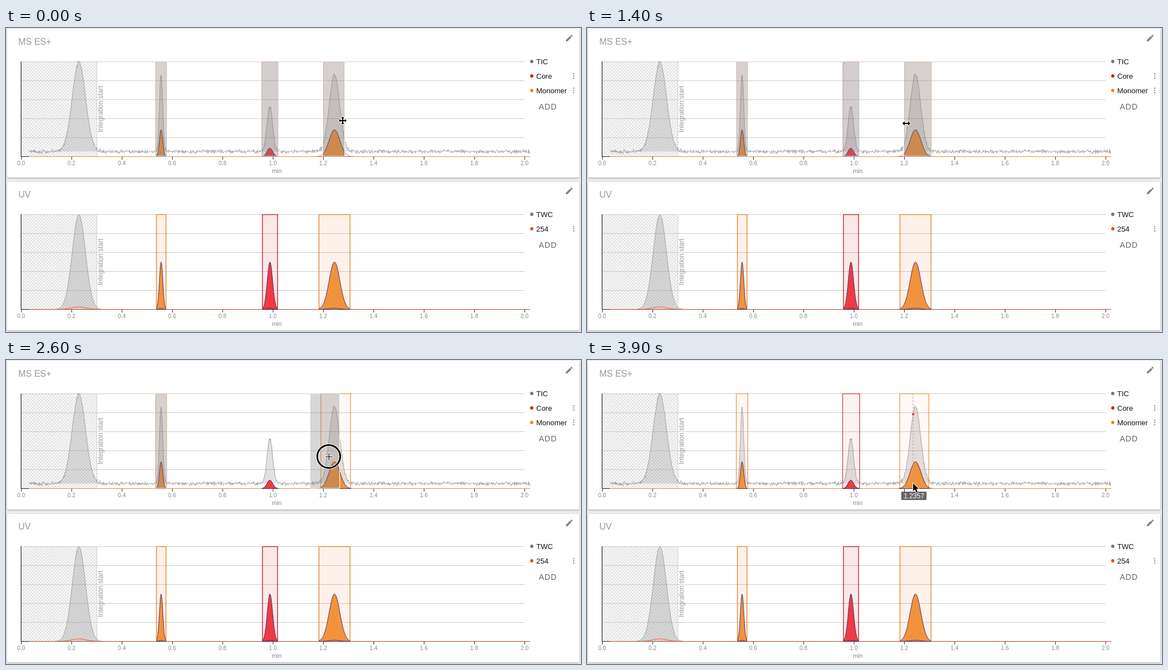
An HTML page for the animation above (4 s loop, 1028x545 px).

```html
<!DOCTYPE html>
<html lang="en">
<head>
<meta charset="utf-8">
<title>Chromatogram</title>
<style>
  html, body { margin: 0; width: 100%; height: 100%; overflow: hidden; background: #ececec; }
  svg { display: block; width: 1028px; height: 545px; font-family: "Liberation Sans", Arial, sans-serif; }
  .card { fill: #fff; filter: drop-shadow(0 1px 1.5px rgba(0,0,0,.3)); }
  .title { font-size: 16px; fill: #999; }
  .tick { font-size: 10px; fill: #888; text-anchor: middle; }
  .unit { font-size: 11px; fill: #888; text-anchor: middle; }
  .legend { font-size: 13px; fill: #111; }
  .add { font-size: 14px; fill: #666; letter-spacing: 1px; }
  .note { font-size: 12px; fill: #999; }
  .line { fill: none; stroke-width: 1; }
  .area { stroke: #43306b; stroke-width: 1; }
  .select { fill: #777; fill-opacity: .3; stroke: #fff; }
</style>
</head>
<body>
<svg id="stage" viewBox="0 0 1028 545">
  <defs>
    <pattern id="hatch" width="4" height="4" patternUnits="userSpaceOnUse" patternTransform="rotate(45)">
      <path d="M0 2H4M2 0V4" stroke="#ccc" stroke-width=".7"/>
    </pattern>
  </defs>
</svg>
<script>
const stage = document.getElementById('stage');
const ORANGE = '#e8892c', RED = '#c8202c', GRAY = '#9a9a9a';
const ORANGE_FILL = '#f2923c', RED_FILL = '#f03a42', ORANGE_TINT = '#f57a30';
const LEFT = 27, RIGHT = 927, START = 41, END = 937, HEIGHT = 170;
const MS = 230, UV = 504;
const MS_ZERO = MS + .5, UV_ZERO = UV + .5;

function add(tag, attrs, parent = stage, text) {
  const el = document.createElementNS(stage.namespaceURI, tag);
  set(el, attrs);
  if (text !== undefined) el.textContent = text;
  return parent.appendChild(el);
}
function set(el, attrs) {
  for (const key in attrs) el.setAttribute(key, attrs[key]);
}
const show = (el, on) => el.setAttribute('visibility', on ? 'visible' : 'hidden');
const label = (cls, x, y, text, more) => add('text', { class: cls, x, y, ...more }, stage, text);
const stroke = (d, color, width = 1, parent) =>
  add('path', { d, class: 'line', stroke: color, style: `stroke-width:${width}` }, parent);

// A peak is [centre, height, sigma].
const gauss = (x, [c, h, s]) => h * Math.exp(-((x - c) ** 2) / (2 * s * s));
const sum = (x, peaks) => peaks.reduce((total, p) => total + gauss(x, p), 0);

function trace(from, to, step, f) {
  let d = '';
  for (let x = from; x < to; x += step) d += `${d ? 'L' : 'M'}${x.toFixed(2)} ${f(x).toFixed(2)}`;
  return d + `L${to} ${f(to).toFixed(2)}`;
}
const areaPath = (from, to, zero, peak) =>
  trace(from, to, .5, x => zero - gauss(x, peak)) + `L${to} ${zero}L${from} ${zero}Z`;
const area = (from, to, zero, peak, fill) =>
  add('path', { class: 'area', d: areaPath(from, to, zero, peak), fill });

let seed = 11;
function random() {
  seed = (seed * 16807) % 2147483647;
  return seed / 2147483647;
}

function box(x0, x1, zero, color, tint, opacity, width) {
  return add('rect', {
    x: x0, y: zero - HEIGHT, width: x1 - x0, height: HEIGHT,
    fill: tint, 'fill-opacity': opacity, stroke: color, 'stroke-width': width
  });
}

function drawFrame(base, cardTop, cardHeight, title, legend) {
  const top = base - HEIGHT;
  add('rect', { class: 'card', x: 2, y: cardTop, width: 1023, height: cardHeight, rx: 2 });
  label('title', 22, top - 30, title);
  add('path', {
    transform: `translate(999 ${top - 50}) scale(.667)`, fill: '#808080',
    d: 'M3 17.25V21h3.75L17.8 9.94l-3.75-3.75zM20.7 7c.4-.4.4-1 0-1.4l-2.3-2.3c-.4-.4-1-.4-1.4 0l-1.9 1.8 3.8 3.8z'
  });
  for (let i = 0; i < 5; i++) stroke(`M${LEFT} ${top + i * 34 + .5}H${RIGHT}`, '#ccc');
  add('rect', { x: LEFT, y: top, width: 136, height: HEIGHT, fill: 'url(#hatch)' });
  stroke(`M162.5 ${top}V${base}`, '#d0d0d0');
  label('note', 0, 0, 'Integration start', { transform: `translate(172.5 ${top + 127}) rotate(-90)` });

  legend.forEach(([name, color, menu], i) => {
    const y = top + i * 26;
    add('circle', { cx: 940, cy: y, r: 2.9, fill: color });
    label('legend', 948, y + 5, name);
    if (menu) for (const dy of [-4, 0, 4]) add('circle', { cx: 1015, cy: y + dy, r: 1.3, fill: '#999' });
  });
  label('add', 952.5, top + legend.length * 26 + 8, 'ADD');
}

function drawAxis(base) {
  stroke(`M${LEFT} ${base - HEIGHT}V${base + .5}`, '#555', 1.6);
  stroke(`M${LEFT} ${base + .5}H${START}`, '#222');
  for (let i = 0; i <= 10; i++) {
    const x = LEFT + i * 90;
    stroke(`M${x + .5} ${base + 1}v5`, '#333');
    label('tick', x, base + 16, (i / 5).toFixed(1));
  }
  label('unit', 484, base + 30, 'min');
}

// Upper chart
drawFrame(MS, 1, 267, 'MS ES+', [['TIC', '#757575'], ['Core', '#d81e1e', 1], ['Monomer', '#ec881e', 1]]);
const FLOOR = 221.5;
const tic = [[130.3, 160, 12], [277.3, 138, 2.9], [471.7, 80, 5], [587.3, 138, 9.4]];
const monomerA = [277.3, 48, 2.9], core = [471.7, 15, 5], monomerB = [587.3, 48, 9.6];

for (const p of tic) {
  const reach = p[2] * 2.9;
  add('path', { d: areaPath(p[0] - reach, p[0] + reach, FLOOR, p), fill: '#777', 'fill-opacity': .22 });
}
stroke(trace(START, END, .7, x => FLOOR - sum(x, tic) + (random() + random() - 1) * 4.2), GRAY, .9);

const boxA = box(267, 287.5, MS_ZERO, ORANGE, ORANGE_TINT, .05, 1.1);
const boxCore = box(457, 487.5, MS_ZERO, RED, RED, .06, 1.1);
const boxB = box(567, 605, MS_ZERO, ORANGE, ORANGE_TINT, .05, 1.1);
stroke(trace(START, END, .7, x => MS_ZERO - gauss(x, core)), RED);
stroke(trace(START, END, .7, x => MS_ZERO - sum(x, [monomerA, monomerB])), ORANGE, 1.1);
area(268, 287, MS_ZERO, monomerA, ORANGE_FILL);
area(457, 487, MS_ZERO, core, RED_FILL);
const areaB = area(567, 605, MS_ZERO, monomerB, ORANGE_FILL);

const selection = (x0, x1) =>
  add('rect', { class: 'select', x: x0 - .5, y: 60, width: x1 - x0 + 1, height: HEIGHT });
const selectA = selection(267, 287.5), selectCore = selection(457, 487), selectB = selection(567, 605);
drawAxis(MS);

// Lower chart
drawFrame(UV, 276, 266, 'UV', [['TWC', '#757575'], ['254', '#e8501e', 1]]);
const solvent = [130.3, 170, 11.8];
add('path', { d: areaPath(90, 168, UV_ZERO, solvent), fill: '#777', 'fill-opacity': .24, stroke: GRAY, 'stroke-width': .9 });
stroke(trace(START, END, 1, x => UV_ZERO - gauss(x, [130.3, 4.5, 13])), '#f0704e', 1.2);
const bands = [
  [269, 286, 277.3, 3, ORANGE, ORANGE_FILL, ORANGE_TINT],
  [458.5, 485.5, 471.9, 4.8, RED, RED_FILL, RED],
  [559.5, 615, 587.3, 9.6, ORANGE, ORANGE_FILL, ORANGE_TINT]
];
stroke(`M${START} ${UV_ZERO}H${END}`, '#b3402c', 1);
for (const [x0, x1, c, s, edge, fill, tint] of bands) {
  box(x0, x1, UV_ZERO, edge, tint, .1, 1.4);
  area(x0 + .5, x1 - .5, UV_ZERO, [c, 85, s], fill);
  area(x0 + .5, x1 - .5, UV_ZERO, [c, 2.2, s], fill);
}
drawAxis(UV);

// Hover read-out
const readout = add('g', {});
const guide = add('path', { stroke: '#aaa', 'stroke-width': 1.2, 'stroke-dasharray': '3 3' }, readout);
const dot = add('circle', { r: 2.2, fill: '#e8453c' }, readout);
const tip = add('g', {}, readout);
add('rect', { x: -22, y: 236, width: 45, height: 15, fill: '#666' }, tip);
const tipText = add('text', { x: .5, y: 248, fill: '#fff', 'font-size': 12, 'text-anchor': 'middle' }, tip);

// Pointers, each drawn around its hot spot
const halo = { fill: '#000', stroke: '#fff', 'stroke-width': 2, 'paint-order': 'stroke', 'stroke-linejoin': 'round' };
const pointer = d => {
  const g = add('g', {});
  if (d) add('path', { d, ...halo }, g);
  return g;
};
const pointers = {
  resize: pointer('M-7 0L-3 -4V-1H3V-4L7 0L3 4V1H-3V4Z'),
  move: pointer('M-7 0L-4 -3V-1H-1V-4H-3L0 -7L3 -4H1V-1H4V-3L7 0L4 3V1H1V4H3L0 7L-3 4H-1V1H-4V3Z'),
  arrow: pointer('M0 0V14L3.3 11L5.6 16.4L8 15.4L5.7 10.1H10Z'),
  press: pointer()
};
const ring = { r: 20.5, fill: 'none' };
add('circle', { ...ring, stroke: '#fff', 'stroke-width': 5 }, pointers.press);
add('circle', { ...ring, stroke: '#000', 'stroke-width': 3 }, pointers.press);
stroke('M-7 .5H8M.5 -7V8', '#fff', 3, pointers.press);
stroke('M-6 .5H7M.5 -6V7', '#000', 1.2, pointers.press);

// time, mode, pointer, x, y, box left and right, selection left and right
const steps = [
  [0,    'hover', 'move',   602, 166, 567, 605],
  [100,  'hover', 'resize', 601, 166, 567, 605],
  [300,  'drag',  'press',  607, 166, 567, 605],
  [500,  'drag',  'press',  608, 166, 567, 605, 567, 606],
  [600,  'drag',  'press',  610, 166, 567, 605, 567, 608],
  [700,  'drag',  'press',  612, 166, 567, 605, 567, 610],
  [800,  'drag',  'press',  613, 166, 567, 605, 567, 611],
  [900,  'drag',  'press',  616, 166, 567, 605, 567, 614],
  [1000, 'drag',  'press',  618, 166, 567, 605, 567, 616],
  [1100, 'hover', 'resize', 615, 167, 567, 616],
  [1200, 'hover', 'move',   600, 168, 567, 616],
  [1300, 'hover', 'move',   582, 170, 567, 616],
  [1400, 'hover', 'resize', 571, 171, 567, 616],
  [1500, 'hover', 'resize', 569, 172, 567, 616],
  [1600, 'drag',  'press',  569, 173, 567, 616],
  [1700, 'drag',  'press',  568, 173, 567, 616, 566, 616],
  [1800, 'drag',  'press',  567, 173, 567, 616, 565, 616],
  [1900, 'drag',  'resize', 566, 173, 567, 616, 564, 616],
  [2000, 'hover', 'resize', 566, 173, 563, 616],
  [2100, 'hover', 'move',   578, 173, 563, 616],
  [2200, 'hover', 'move',   592, 173, 563, 616],
  [2300, 'drag',  'press',  596, 173, 563, 616],
  [2400, 'drag',  'press',  592, 173, 563, 616, 559, 612],
  [2500, 'drag',  'press',  584, 173, 563, 616, 551, 604],
  [2600, 'drag',  'press',  577, 173, 563, 616, 544, 596],
  [2800, 'hover', 'move',   577, 173, 544, 596],
  [3000, 'drag',  'press',  577, 173, 544, 596],
  [3100, 'drag',  'press',  581, 173, 544, 596, 548, 600],
  [3200, 'drag',  'press',  587, 173, 544, 596, 554, 605],
  [3300, 'drag',  'press',  591, 173, 544, 596, 558, 610],
  [3400, 'drag',  'press',  592, 173, 544, 596, 559, 611],
  [3500, 'hover', 'move',   592, 173, 559, 611],
  [3600, 'hover', 'move',   592, 179, 559, 611],
  [3700, 'idle',  'arrow',  590, 196, 559, 611],
  [3800, 'idle',  'arrow',  585, 214, 559, 611],
  [3900, 'idle',  'arrow',  583, 221, 559, 611]
];

function render([, mode, kind, x, y, b0, b1, s0 = b0, s1 = b1]) {
  const idle = mode === 'idle', drag = mode === 'drag';
  set(boxB, { x: b0, width: b1 - b0 });
  set(selectB, { x: s0 - .5, width: s1 - s0 + 1 });
  set(areaB, { d: areaPath(b0, b1, MS_ZERO, monomerB) });
  for (const b of [boxA, boxCore, boxB]) set(b, { 'stroke-opacity': mode === 'hover' ? .6 : 1 });
  show(boxCore, !drag);
  show(selectA, !idle);
  show(selectB, !idle);
  show(selectCore, mode === 'hover');

  show(readout, idle);
  set(guide, { d: `M${x} 60V${MS}` });
  set(dot, { cx: x, cy: FLOOR - sum(x, tic) });
  set(tip, { transform: `translate(${x + 1} 0)` });
  tipText.textContent = ((x + .07 - LEFT) / 450).toFixed(4);

  for (const name in pointers) show(pointers[name], name === kind);
  set(pointers[kind], { transform: `translate(${x} ${y})` });
}

let current;
function tick() {
  const t = performance.now() % 4000;
  const step = steps.findLast(s => s[0] <= t);
  if (step !== current) render(current = step);
  requestAnimationFrame(tick);
}
tick();
</script>
</body>
</html>
```
